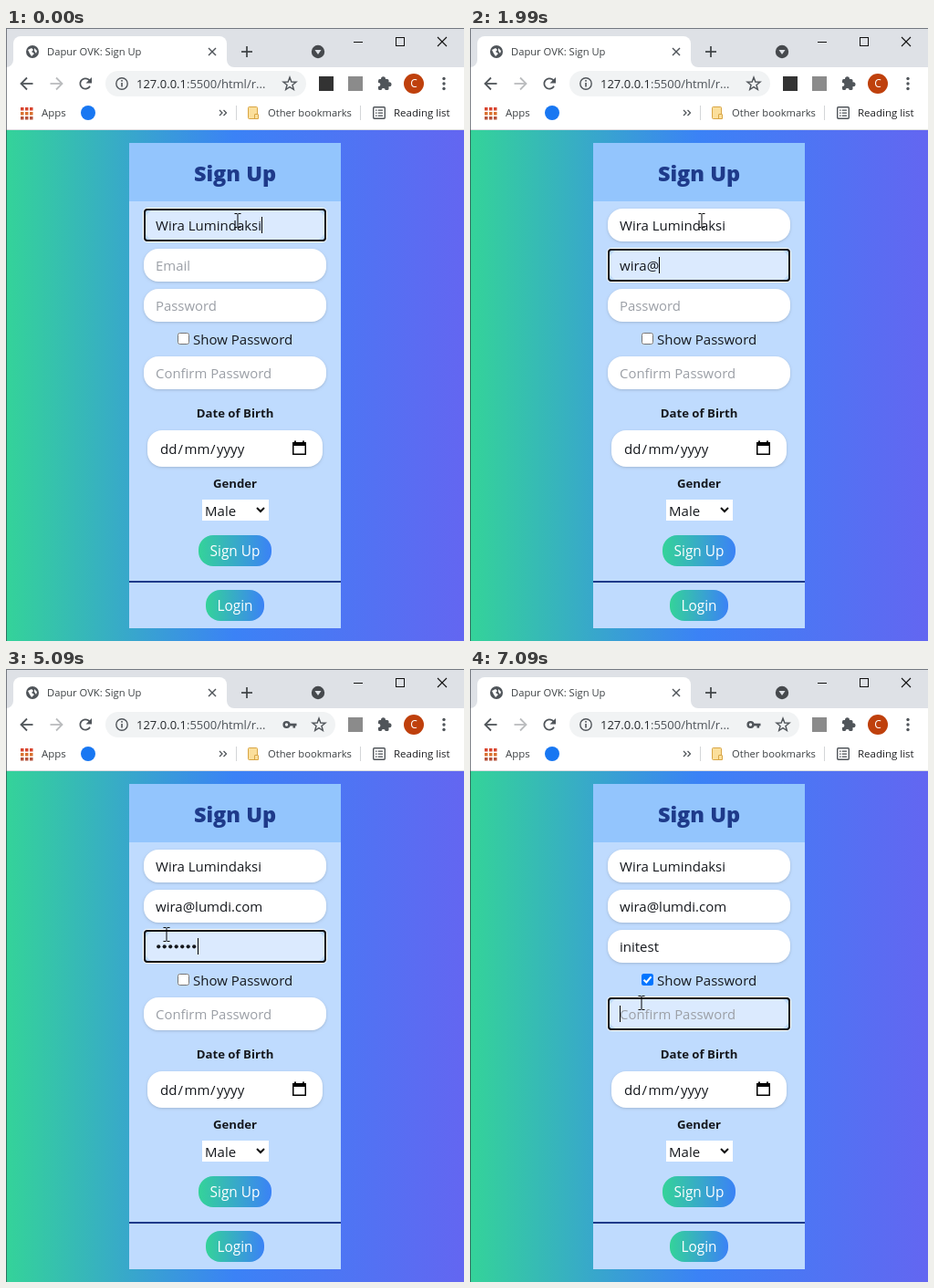
Write an HTML page with a canvas that moves like this. It is 502 by 672 pixels and loops after 8000 ms.

```html
<!DOCTYPE html>
<html lang="en">
<head>
<meta charset="utf-8">
<title>Sign Up</title>
<style>
html, body { margin: 0; width: 100%; height: 100%; overflow: hidden; }
canvas { display: block; width: 502px; height: 672px; }
</style>
</head>
<body>
<canvas id="stage"></canvas>
<script>
const W = 502, H = 672, LOOP = 8000;
const NAME = 'Wira Lumindaksi', MAIL = 'wira@lumdi.com', SECRET = 'initest';
const GREEN = '#34d399', BLUE = '#3b82f6', INDIGO = '#6366f1', NAVY = '#1e3a8a';
const INK = '#15181d', HINT = '#9b9fa6', ICON = '#50555a';

const canvas = document.getElementById('stage');
const c = canvas.getContext('2d');
const dpr = window.devicePixelRatio || 1;
canvas.width = W * dpr;
canvas.height = H * dpr;

// Each step adds its changes to the state before it.
const steps = [
  { at: 0, focus: 'name', caret: true, mail: '', dots: 0, plain: false, key: false, cursor: ['beam', 254, 211] },
  { at: 1000, focus: 'mail', caret: false },
  { at: 1990, mail: MAIL.slice(0, 5), caret: true },
  { at: 3000, mail: MAIL },
  { at: 4090, focus: 'pass', dots: 3, key: true },
  { at: 5090, dots: 7, cursor: ['beam', 176, 291] },
  { at: 6100, focus: 'confirm', caret: false, cursor: ['arrow', 188, 338] },
  { at: 7090, plain: true, caret: true, cursor: ['beam', 188, 366] }
];

function stateAt(t) {
  return Object.assign({}, ...steps.filter(s => s.at <= t));
}

function rect(x, y, w, h, color) {
  c.fillStyle = color;
  c.fillRect(x, y, w, h);
}

function roundPath(x, y, w, h, r) {
  c.beginPath();
  c.moveTo(x + r, y);
  c.arcTo(x + w, y, x + w, y + h, r);
  c.arcTo(x + w, y + h, x, y + h, r);
  c.arcTo(x, y + h, x, y, r);
  c.arcTo(x, y, x + w, y, r);
  c.closePath();
}

function round(x, y, w, h, r, color) {
  roundPath(x, y, w, h, r);
  c.fillStyle = color;
  c.fill();
}

function roundLine(x, y, w, h, r, color, width = 1) {
  roundPath(x, y, w, h, r);
  c.strokeStyle = color;
  c.lineWidth = width;
  c.stroke();
}

function disc(x, y, r, color) {
  c.beginPath();
  c.arc(x, y, r, 0, 7);
  c.fillStyle = color;
  c.fill();
}

function ring(x, y, r, color, width, from = 0, to = Math.PI * 2) {
  c.beginPath();
  c.arc(x, y, r, from, to);
  c.strokeStyle = color;
  c.lineWidth = width;
  c.stroke();
}

function trace(pts) {
  c.beginPath();
  for (let i = 0; i < pts.length; i += 2) c.lineTo(pts[i], pts[i + 1]);
}

function line(color, width, ...pts) {
  trace(pts);
  c.strokeStyle = color;
  c.lineWidth = width;
  c.stroke();
}

function poly(color, ...pts) {
  trace(pts);
  c.closePath();
  c.fillStyle = color;
  c.fill();
}

function text(str, x, y, size, color, weight = 400, align = 'left') {
  c.font = `${weight} ${size}px "Open Sans", "Noto Sans", sans-serif`;
  c.textAlign = align;
  c.fillStyle = color;
  c.fillText(str, x, y);
  return c.measureText(str).width;
}

function gradient(x0, x1, ...colors) {
  const g = c.createLinearGradient(x0, 0, x1, 0);
  colors.forEach((color, i) => g.addColorStop(i / (colors.length - 1), color));
  return g;
}

function globe(x, y) {
  disc(x, y, 7, ICON);
  poly('#fff', x - 5, y - 2, x - 1, y - 4, x + 1, y - 2, x - 1, y, x + 2, y + 2, x - 1, y + 5, x - 3, y + 2);
  poly('#fff', x + 2, y - 4, x + 5, y - 1, x + 4, y + 2, x + 2, y - 1);
}

function tabStrip() {
  rect(0, 0, W, 43, '#dee1e6');
  round(8, 9, 234, 42, 8, '#fff');
  for (const [x, edge] of [[0, 0], [242, 250]]) {
    rect(x, 35, 8, 8, '#fff');
    c.save();
    c.beginPath();
    c.rect(x, 35, 8, 8);
    c.clip();
    disc(edge, 35, 8, '#dee1e6');
    c.restore();
  }
  globe(29, 26);
  text('Dapur OVK: Sign Up', 45, 30, 11.2, '#3c4043');
  line(ICON, 1.5, 222, 22, 230, 30);
  line(ICON, 1.5, 230, 22, 222, 30);
  line('#3c4043', 1.7, 258, 26, 270, 26);
  line('#3c4043', 1.7, 264, 20, 264, 32);
  disc(342, 26, 7.2, '#46494d');
  poly('#dee1e6', 338.5, 24, 345.5, 24, 342, 29);
  line('#111', 1, 381, 15.5, 391, 15.5);
  c.strokeRect(427.5, 10.5, 9, 9);
  line('#111', 1.1, 473, 10, 483, 20);
  line('#111', 1.1, 483, 10, 473, 20);
}

function arrow(x, y, dir, color) {
  line(color, 1.8, x - 6.5 * dir, y, x + 6 * dir, y);
  line(color, 1.8, x, y - 6.5, x + 6.5 * dir, y, x, y + 6.5);
}

function star(x, y) {
  const pts = [];
  for (let i = 0; i < 10; i++) {
    const r = i % 2 ? 3.1 : 7.4, a = (i / 5 - 0.5) * Math.PI;
    pts.push(x + r * Math.cos(a), y + 0.5 + r * Math.sin(a));
  }
  trace(pts);
  c.closePath();
  c.strokeStyle = ICON;
  c.lineWidth = 1.4;
  c.stroke();
}

function toolbar(s) {
  rect(0, 43, W, 69, '#fff');
  arrow(23, 61, -1, ICON);
  arrow(55, 61, 1, '#babcbe');
  ring(87, 61, 5.7, ICON, 1.8, 0.5, 5.6);
  poly(ICON, 94, 54, 94, 60.5, 87.5, 60.5);

  round(109, 47, s.key ? 252 : 220, 28, 14, '#f1f3f4');
  ring(127, 61, 6.2, ICON, 1.4);
  rect(126.2, 60, 1.6, 4.5, ICON);
  rect(126.2, 57, 1.6, 1.7, ICON);
  const host = text('127.0.0.1', 143, 66, 13, '#25282c');
  text(':5500/html/r...', 143 + host, 66, 13, '#4c5157');
  if (s.key) {
    ring(307.5, 61, 2.9, ICON, 2.4);
    rect(311, 59.7, 7.5, 2.7, ICON);
    rect(314.5, 61, 2.6, 3.6, ICON);
    star(343, 61);
  } else {
    star(311, 61);
    rect(343, 53, 16, 16, '#333');
  }
  rect(375, 53, 16, 16, '#8b8b8b');

  round(408, 56, 11.5, 12, 1.5, ICON);
  disc(413.5, 55.7, 2.5, ICON);
  disc(420, 61.8, 2.5, ICON);
  disc(408.3, 62, 2.1, '#fff');
  disc(413.6, 68, 2.1, '#fff');
  disc(447, 61, 11, '#bf400c');
  text('C', 447, 65.3, 12, '#fff', 400, 'center');
  for (const y of [55.5, 61, 66.5]) disc(480, y, 1.7, ICON);
}

function bookmarks() {
  const tones = ['#d8452f', '#d9702f', '#b5533c'];
  for (let i = 0; i < 9; i++) {
    const row = Math.floor(i / 3);
    rect(16 + i % 3 * 5, 87 + row * 5, 3.5, 3.5, tones[row]);
  }
  text('Apps', 39, 97, 11.4, '#3c4043');
  disc(90, 93, 8, '#1877f2');
  for (const x of [234, 238.5]) line(ICON, 1.3, x, 90, x + 3, 93, x, 96);
  rect(252, 85, 1, 16, '#d3d5d8');
  rect(388, 85, 1, 16, '#d3d5d8');
  round(265.5, 86.5, 10, 13, 1, '#fbdf9b');
  roundLine(265.5, 86.5, 10, 13, 1, '#d8a545');
  rect(273, 95, 4, 5, '#fbdf9b');
  roundLine(272.5, 94.5, 4, 5, 0.5, '#d8a545');
  text('Other bookmarks', 287, 97, 11.2, '#3c4043');
  roundLine(402.7, 86.7, 12.6, 12.6, 1, ICON, 1.4);
  for (const y of [89.5, 92.5, 95.5]) {
    rect(405, y, 1.5, 1.3, ICON);
    rect(407.7, y, 5.3, 1.3, ICON);
  }
  text('Reading list', 425, 97, 11.5, '#202124');
  rect(0, 111, W, 1, '#dadce0');
}

function shadowed(x, y, w, h, r, fill) {
  c.save();
  c.shadowColor = 'rgba(0,0,0,.16)';
  c.shadowBlur = 3 * dpr;
  c.shadowOffsetY = dpr;
  round(x, y, w, h, r, fill);
  c.restore();
}

function caretAt(x, y) {
  rect(Math.round(x), y, 1, 18, '#000');
}

function field(y, hint, value, focused, caret, dots = 0) {
  const mid = y + 18;
  if (focused) round(151, y, 200, 36, 16, '#dbeafe');
  else shadowed(151, y, 200, 36, 16, '#fff');
  let end = 164;
  if (dots) {
    for (let i = 0; i < dots; i++) disc(167.2 + i * 6.5, mid + 0.3, 2.1, INK);
    end += dots * 6.5;
  } else if (value) {
    end += text(value, 164, mid + 6, 15, INK);
  } else {
    text(hint, 164, mid + 6, 14.9, HINT);
  }
  if (focused) {
    roundLine(150.5, y - 0.5, 201, 37, 4, '#fff');
    roundLine(152, y + 1, 198, 34, 3, '#101010', 2);
    if (caret) caretAt(end, y + 9);
  }
}

function button(label, x, y, w) {
  round(x, y, w, 34, 16, gradient(x, x + w, GREEN, BLUE));
  text(label, x + w / 2, y + 23, 15.4, '#fff', 400, 'center');
}

function checkbox(on) {
  round(188, 334, 13, 13, 2.5, on ? '#0075ff' : '#fff');
  if (on) line('#fff', 2, 190.5, 340.8, 193.3, 343.5, 198.5, 337.3);
  else roundLine(188.5, 334.5, 12, 12, 2, '#767676');
}

function calendar() {
  rect(314, 454, 15, 14, '#000');
  rect(315.5, 458, 12, 8.5, '#fff');
  rect(316, 452.5, 2, 2, '#000');
  rect(325, 452.5, 2, 2, '#000');
}

function form(s) {
  rect(0, 112, W, H - 112, gradient(0, W, GREEN, BLUE, INDIGO));
  rect(135, 126, 232, 532, '#bfdbfe');
  rect(135, 126, 232, 64, '#93c5fd');
  text('Sign Up', 251, 168, 23.5, NAVY, 800, 'center');

  field(198, 'Name', NAME, s.focus === 'name', s.caret);
  field(242, 'Email', s.mail, s.focus === 'mail', s.caret);
  field(286, 'Password', s.plain ? SECRET : '', s.focus === 'pass', s.caret, s.plain ? 0 : s.dots);
  checkbox(s.plain);
  text('Show Password', 205, 347, 15, INK);
  field(360, 'Confirm Password', '', s.focus === 'confirm', s.caret);

  text('Date of Birth', 251, 427, 13.2, INK, 700, 'center');
  shadowed(155, 441, 192, 40, 16, '#fff');
  [['dd', 169], ['/', 188.5], ['mm', 195.5], ['/', 224], ['yyyy', 231]]
    .forEach(([part, x]) => text(part, x, 467, 15, INK));
  calendar();

  text('Gender', 251, 504, 13.2, INK, 700, 'center');
  rect(215, 517, 73, 23, '#fff');
  text('Male', 218, 535, 15, INK);
  line('#111', 2, 275, 526, 279, 530, 283, 526);

  button('Sign Up', 211, 556, 80);
  rect(135, 606, 232, 2, NAVY);
  button('Login', 219, 616, 64);
}

function pointer([kind, x, y]) {
  if (kind === 'beam') {
    rect(x - 0.5, y - 7, 1, 14, '#000');
    for (const dy of [-8, 7]) {
      rect(x - 3.5, y + dy, 3, 1, '#000');
      rect(x + 0.5, y + dy, 3, 1, '#000');
    }
    return;
  }
  poly('#fff', x + 0.5, y + 0.5, x + 0.5, y + 16.5, x + 4.2, y + 13, x + 6.7, y + 18.7,
    x + 9, y + 17.7, x + 6.6, y + 12.2, x + 11.5, y + 12);
  c.strokeStyle = '#000';
  c.lineWidth = 1;
  c.stroke();
}

function draw(now) {
  const s = stateAt(now % LOOP);
  c.setTransform(dpr, 0, 0, dpr, 0, 0);
  tabStrip();
  toolbar(s);
  bookmarks();
  form(s);
  rect(0, 0, W, 1, 'rgba(45,50,60,.6)');
  rect(0, 1, 1, H, 'rgba(45,50,60,.6)');
  pointer(s.cursor);
}

const start = performance.now();
function tick() {
  draw(performance.now() - start);
  requestAnimationFrame(tick);
}
tick();
</script>
</body>
</html>
```
